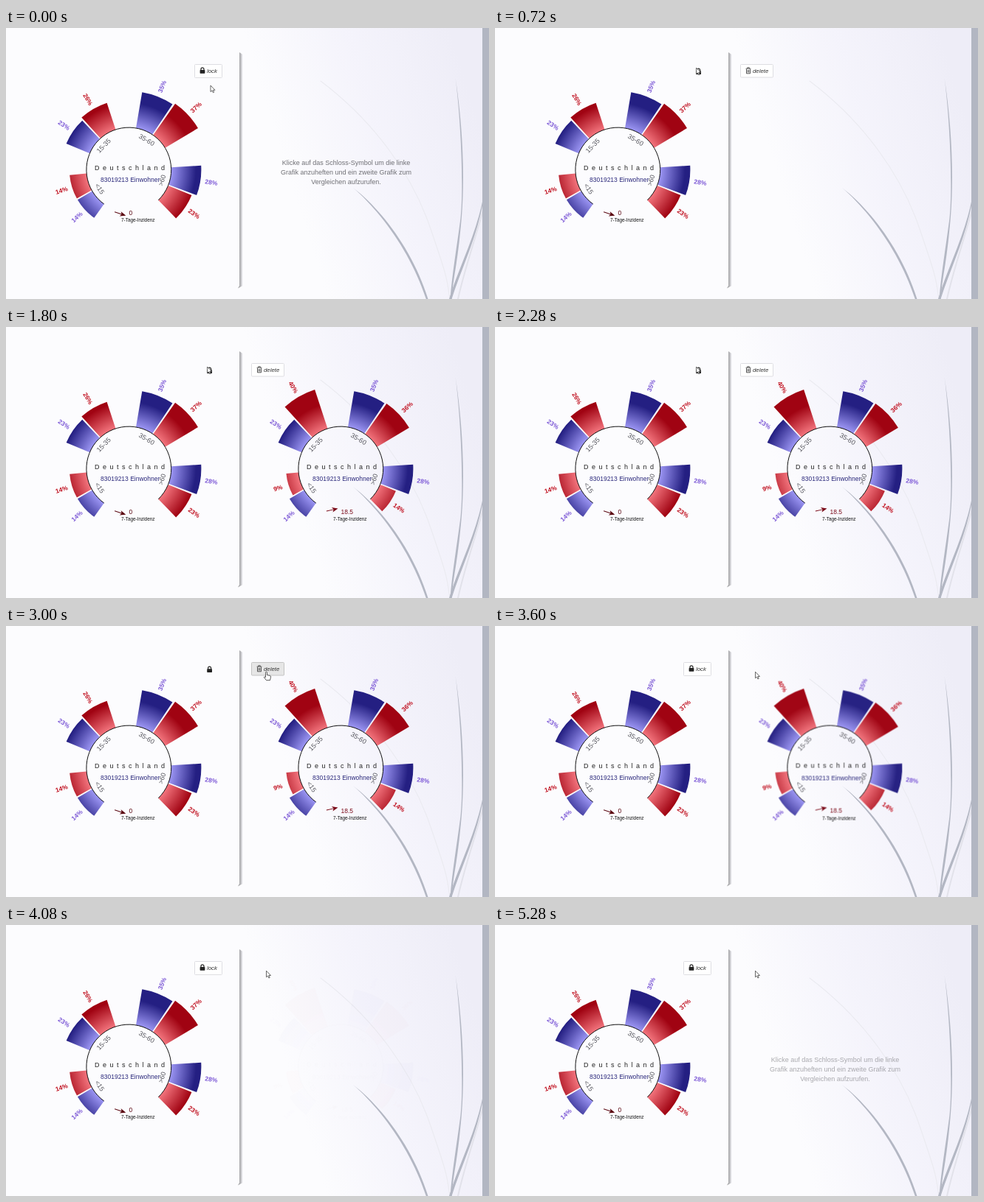
An HTML page for the animation above (5400 ms loop, 654 by 368 pixels).

```html
<!DOCTYPE html>
<html lang="de">
<head>
<meta charset="utf-8">
<style>
  html, body { margin: 0; width: 100%; height: 100%; overflow: hidden; background: #fcfcfe; }
  svg { display: block; width: 654px; height: 368px; font-family: "Liberation Sans", Arial, sans-serif; }
</style>
</head>
<body>
<svg viewBox="0 0 654 368" xmlns="http://www.w3.org/2000/svg">
  <defs>
    <linearGradient id="haze" gradientUnits="userSpaceOnUse" x1="395" y1="240" x2="650" y2="160">
      <stop offset="0" stop-color="#f3f2fb" stop-opacity="0"/>
      <stop offset=".5" stop-color="#f3f2fb" stop-opacity=".85"/>
      <stop offset="1" stop-color="#eeedf7"/>
    </linearGradient>
    <linearGradient id="edge">
      <stop offset="0" stop-color="#9c9c9f"/>
      <stop offset=".5" stop-color="#b3b3b6"/>
      <stop offset="1" stop-color="#f2f2f6"/>
    </linearGradient>
    <radialGradient id="blue" gradientUnits="userSpaceOnUse" cx="0" cy="0" r="91">
      <stop offset=".63" stop-color="#9c96f4"/>
      <stop offset="1" stop-color="#241f82"/>
    </radialGradient>
    <radialGradient id="red" gradientUnits="userSpaceOnUse" cx="0" cy="0" r="91">
      <stop offset=".63" stop-color="#f3747d"/>
      <stop offset="1" stop-color="#a00312"/>
    </radialGradient>
    <g id="padlock">
      <path d="M-2 0V-1.7a2 2 0 0 1 4 0V0" fill="none" stroke="#222" stroke-width="1.2"/>
      <rect x="-3.4" y="-.5" width="6.8" height="4.6" rx=".6" fill="#222"/>
    </g>
  </defs>

  <rect width="654" height="368" fill="#fcfcfe"/>
  <rect x="320" width="334" height="368" fill="url(#haze)"/>
  <g fill="none" stroke-linecap="round">
    <path d="M426 72C500 128 550 200 574 270S597 340 601 368" stroke="#ebebf1" stroke-width="1.2"/>
    <path d="M648 240C636 285 620 330 612 368" stroke="#e2e2ea" stroke-width="2"/>
  </g>
  <g fill="#b3b7c3">
    <path d="M608.6 68C618 130 622 200 616.5 262S606 335 603.5 368H601.5C604 335 610 300 615 262S616.5 130 608.6 68Z"/>
    <path d="M470 217C508 246 551 302 571.5 368H568.8C548 304 506 248 470 217Z"/>
    <path d="M646 236C638 284 616 328 603.5 368H600C612 328 635 284 645 236Z"/>
  </g>
  <rect x="645" width="9" height="368" fill="#b2b6c2"/>
  <path d="M316 33L320.5 36V350L314 353.5L316 350Z" fill="url(#edge)"/>

  <g id="hint" font-size="9" fill="#6f6f74" text-anchor="middle">
    <text x="460.5" y="186.3">Klicke auf das Schloss-Symbol um die linke</text>
    <text x="460.5" y="199.3">Grafik anzuheften und ein zweite Grafik zum</text>
    <text x="460.5" y="212.2">Vergleichen aufzurufen.</text>
  </g>
  <g id="left" transform="translate(166.3 192.5)"></g>
  <g id="right" transform="translate(453.3 192.5)"></g>

  <g id="lockButton" font-size="7.8" font-style="italic" fill="#333">
    <rect id="lockBox" x="255.5" y="49.5" width="37" height="18" rx="1"/>
    <use href="#padlock" x="266" y="57.6"/>
    <text x="272" y="61.2">lock</text>
  </g>
  <use id="pinned" href="#padlock" x="275.6" y="58.8"/>
  <g id="deleteButton" font-size="7.8" font-style="italic" fill="#333">
    <rect id="deleteBox" x="332.5" y="49.5" width="44" height="17.5" rx="1"/>
    <path d="M339.6 55.2H346.4M341.7 55V53.8H344.3V55M340.5 56V61.8H345.5V56M342.2 57V60.5M343.8 57V60.5" fill="none" stroke="#444" stroke-width=".9"/>
    <text x="349" y="61">delete</text>
  </g>

  <g id="arrow"><path d="M0 0V8.6L2 6.8L3.4 9.8L4.7 9.2L3.4 6.3H6Z" fill="#fff" stroke="#444" stroke-width=".8"/></g>
  <g id="hand"><path d="M-1 1a1 1 0 0 1 2 0V4.4L5 5.2Q6.3 5.6 6 7L5 11.5H0L-3.2 7.4Q-3 6-1 7.4Z" fill="#fff" stroke="#333" stroke-width=".8"/></g>
</svg>
<script>
const $ = id => document.getElementById(id);
const INNER = 57.4, FIRST = 215.7, GROUP = 77, BAR = 23.9, PAIR = 25.3;
const AGES = ['&lt;15', '15-35', '35-60', '&gt;60'];

const polar = (r, deg) => {
  const a = deg * Math.PI / 180;
  return [r * Math.sin(a), -r * Math.cos(a)].map(v => v.toFixed(2));
};

function sector(r, a, b) {
  return `M${polar(INNER, a)}L${polar(r, a)}A${r} ${r} 0 0 1 ${polar(r, b)}` +
    `L${polar(INNER, b)}A${INNER} ${INNER} 0 0 0 ${polar(INNER, a)}Z`;
}

function label(text, r, deg, turn, style) {
  return `<text transform="translate(${polar(r, deg)}) rotate(${turn})" y="3.1" text-anchor="middle" ${style}>${text}</text>`;
}

function bar(percent, start, kind) {
  const r = 62.8 + 1.26 * percent, mid = (start + BAR / 2) % 360;
  const turn = mid > 180 ? mid - 270 : mid - 90;
  const color = kind === 'blue' ? '#7c58d6' : '#c0101f';
  return `<path d="${sector(r, start, start + BAR)}" fill="url(#${kind})"/>` +
    label(percent + '%', r + 14.8, mid, turn, `font-size="8.5" font-weight="bold" fill="${color}"`);
}

function chart(blues, reds, incidence, tilt, color) {
  const arc = [polar(INNER, FIRST), polar(INNER, FIRST + 3 * GROUP + PAIR + BAR)];
  let out = '';
  AGES.forEach((age, i) => {
    const start = FIRST + i * GROUP, mid = (start + 21) % 360;
    const turn = mid > 90 && mid < 270 ? mid - 180 : mid;
    out += bar(blues[i], start, 'blue') + bar(reds[i], start + PAIR, 'red') +
      label(age, 47.2, mid, turn, 'font-size="9" fill="#55555c"');
  });
  return out + `
    <path d="M${arc[0]}A${INNER} ${INNER} 0 1 1 ${arc[1]}" fill="none" stroke="#111"/>
    <text x="-46.3" y=".4" font-size="9" letter-spacing="4.5" fill="#222">Deutschland</text>
    <text x="-38.3" y="16.5" font-size="8.5" fill="#2c2a7c">83019213 Einwohner</text>
    <g transform="translate(-11.6 ${tilt > 0 ? 59.8 : 55.8}) rotate(${tilt})">
      <path d="M-8 0H3" stroke="${color}"/><path d="M8 0L0 3.3L2 0L0-3.3Z" fill="${color}"/>
    </g>
    <text x=".2" y="61.2" font-size="8.5" fill="${color}">${incidence}</text>
    <text x="-10.3" y="70.6" font-size="6.4" fill="#111">7-Tage-Inzidenz</text>`;
}

$('left').innerHTML = chart([14, 23, 35, 28], [14, 26, 37, 23], '0', 18, '#5a0610');
$('right').innerHTML = chart([14, 23, 35, 28], [9, 40, 36, 14], '18.5', -13, '#7a0a18');

const LOOP = 5400, STEP = 120, LOCKED = 600, DELETED = 3600;

// Swing easing over a span of time, clamped to 0..1
const swing = (t, start, length) => {
  const p = Math.min(1, Math.max(0, (t - start) / length));
  return 0.5 - 0.5 * Math.cos(Math.PI * p);
};
const mix = (a, b, p) => a + (b - a) * p;
const show = (id, on) => $(id).setAttribute('visibility', on ? 'visible' : 'hidden');

function paintBox(id, hover) {
  $(id).setAttribute('fill', hover ? '#e6e6e6' : '#fff');
  $(id).setAttribute('stroke', hover ? '#c4c4c4' : '#dedee2');
}

function draw(t) {
  const locked = t >= LOCKED && t < DELETED;
  const onLock = t >= 240 && t < LOCKED;
  const onDelete = t >= 2880 && t < DELETED;

  $('hint').setAttribute('opacity', t < LOCKED ? 1 : swing(t, 4150, 2050));
  $('right').setAttribute('opacity', t < 3000 ? swing(t, 820, 800) : 1 - swing(t, 3555, 565));
  show('lockButton', !locked);
  show('pinned', locked);
  show('deleteButton', locked);
  paintBox('lockBox', onLock);
  paintBox('deleteBox', onDelete);

  const rise = swing(t, 0, 360), cross = swing(t, 2640, 360);
  const x = mix(mix(277, 272.5, rise), 352.5, cross);
  const y = mix(mix(78, 54, rise), 62.2, cross);
  const pointing = onLock || onDelete;
  show('arrow', !pointing);
  show('hand', pointing);
  for (const id of ['arrow', 'hand']) $(id).setAttribute('transform', `translate(${x} ${y})`);
}

const begin = performance.now();
function tick() {
  const t = (performance.now() - begin) % LOOP;
  draw(Math.floor(t / STEP) * STEP);
  requestAnimationFrame(tick);
}
tick();
</script>
</body>
</html>
```
